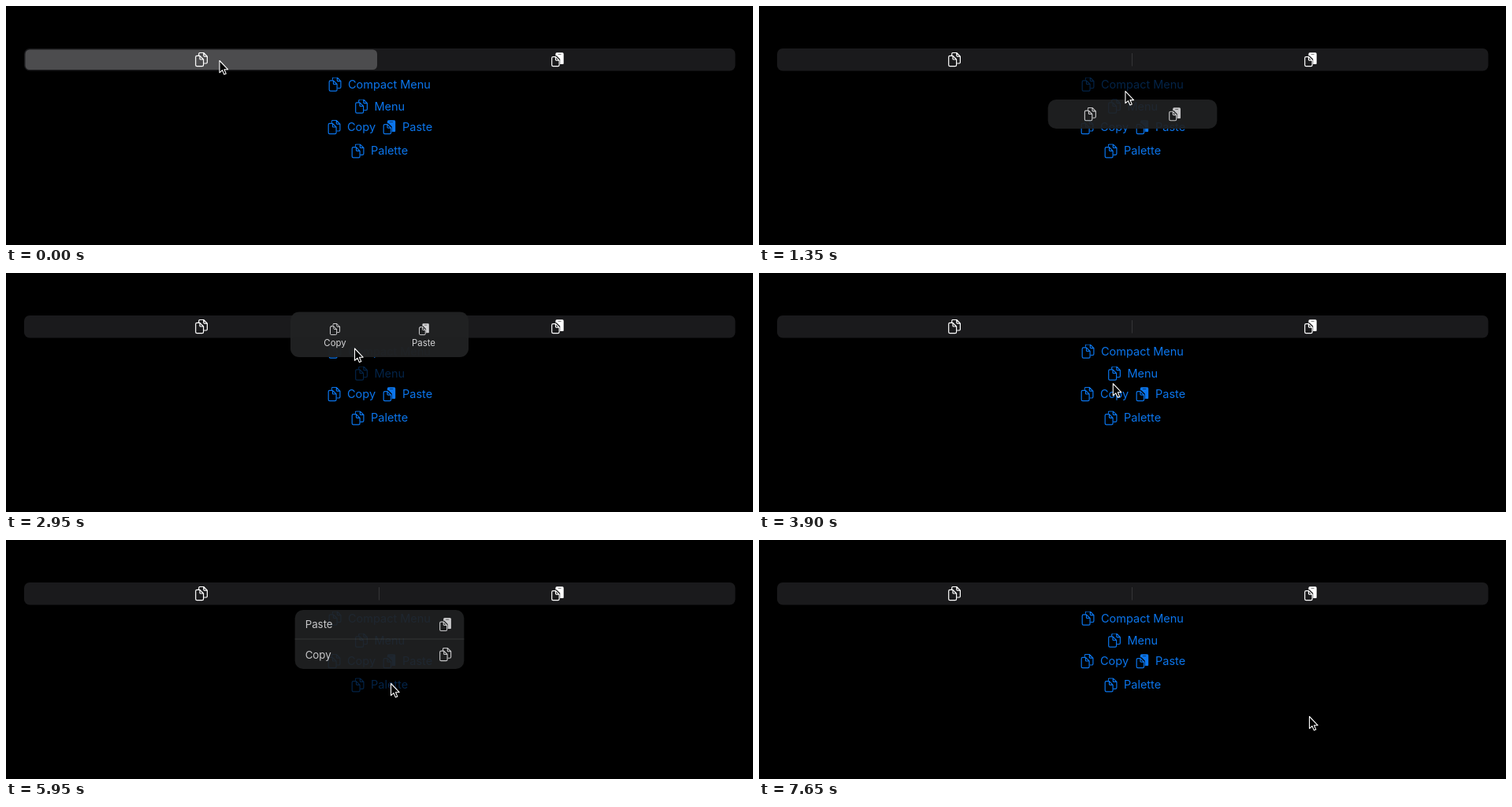
Animation, 948 px wide and 304 px high, one loop 7750 ms. Source, as an HTML page:

```html
<!DOCTYPE html>
<html lang="en">
<head>
<meta charset="utf-8">
<title>Control group styles</title>
<style>
html, body { margin: 0; width: 100%; height: 100%; overflow: hidden; background: #000; }
svg { display: block; width: 948px; height: 304px; }
text { font: 14.5px Inter, Roboto, sans-serif; fill: currentColor; }
.blue { color: #0b75ec; }
.white { color: #fff; }
.popup { color: #d2d2d4; }
.popup text { font-size: 14px; }
.small text { font-size: 11.4px; text-anchor: middle; }
.panel { fill: #202122; fill-opacity: .98; }
.line { fill: none; stroke: currentColor; stroke-width: 1.2; stroke-linejoin: round; stroke-linecap: round; }
</style>
</head>
<body>
<svg id="stage" viewBox="0 0 948 304"></svg>
<script>
const LOOP = 7750, STEP = 50, MID = 474, TRAVEL = 350;
const el = id => document.getElementById(id);
const clamp = x => Math.max(0, Math.min(1, x));
const ramp = (t, from, length) => clamp((t - from) / length);
const smooth = p => p * p * (3 - 2 * p);
const fade = (id, value) => el(id).setAttribute('opacity', value);

// ---- drawing helpers ----

// a sheet with rounded corners and a folded top right corner
function page(x, y, w, h, fold = 4.6, r = 1.6) {
  return `<path class="line" d="M${x + r} ${y}h${w - fold - r}l${fold} ${fold}v${h - fold - r}q0 ${r} ${-r} ${r}
    h${2 * r - w}q${-r} 0 ${-r} ${-r}v${2 * r - h}q0 ${-r} ${r} ${-r}z
    M${x + w - fold} ${y}v${fold - 1}q0 1 1 1h${fold - 1}"/>`;
}

const icon = (name, x, y, scale = 1) =>
  `<use href="#${name}" transform="translate(${x} ${y}) scale(${scale})"/>`;
const text = (x, y, words) => `<text x="${x}" y="${y}">${words}</text>`;
const label = (id, x, y, words, name = 'copy') =>
  `<g id="${id}Label">${icon(name, x, y)}${text(x + 16.5, y + 5.1, words)}</g>`;
const panel = (y, height) =>
  `<rect class="panel" x="361" y="${y}" width="226" height="${height}" rx="11"/>`;
const segment = (id, x) =>
  `<rect id="${id}" x="${x}" y="55.5" width="446.500" height="25.5" rx="5.5" fill="#4c4c4e"/>`;
const pair = (left, right, y, scale) => icon('copy', left, y, scale) + icon('paste', right, y, scale);

el('stage').innerHTML = `
  <defs>
    <clipPath id="behind"><path d="M-4-9H9V6H3.2V-.4L-1.200-4.800H-4z"/></clipPath>
    <g id="copy">${page(-7.3, -4.6, 9.9, 13.2)}<g clip-path="url(#behind)">${page(-3.3, -8.5, 10.7, 13.5)}</g></g>
    <g id="paste">
      <rect x="-2.600" y="-8.700" width="10.300" height="15" rx="1.600" fill="currentColor" clip-path="url(#behind)"/>
      <path d="M.6-6.400H4.600" stroke="#000" stroke-opacity=".5"/>
      ${page(-7.3, -3.4, 9.4, 12.1)}
    </g>
  </defs>
  <rect x="23" y="54" width="902.5" height="28.5" rx="7" fill="#1a1a1c"/>
  <path id="divider" d="M473.5 60V76.5" stroke="#353537"/>
  ${segment('left', 24.5)}${segment('right', 476.5)}
  <g class="white">${pair(248, 700, 68)}</g>
  <g class="blue">
    ${label('compact', 417.5, 99.5, 'Compact Menu')}
    ${label('menu', 451, 127.5, 'Menu')}
    ${label('copy', 416.5, 154, 'Copy')}${label('paste', 486.5, 154, 'Paste', 'paste')}
    ${label('palette', 446.5, 184.3, 'Palette')}
  </g>
  <g id="compactPopup" class="popup">${panel(119, 39)}${pair(417.5, 530.5, 138.5)}</g>
  <g id="menuPopup" class="popup small">
    ${panel(49.5, 57.5)}${pair(417.5, 530.5, 71.5, .82)}
    ${text(417.5, 92.7, 'Copy')}${text(530, 92.7, 'Paste')}
  </g>
  <g id="palettePopup" class="popup">
    ${panel(85, 79)}<path d="M361 124H587" stroke="#3a3b3d"/>
    ${text(374.7, 109.5, 'Paste')}${text(374.7, 150, 'Copy')}
    ${icon('paste', 562, 104.3)}${icon('copy', 562, 144.5)}
  </g>
  <path id="cursor" d="M0 0V15.300L3.500 12.200 5.900 17.600 8.300 16.600 6 11.200H10.600z"
    fill="#000" stroke="#fff" stroke-width="1.1" stroke-linejoin="round"/>`;

// ---- motion ----

// where the pointer rests, and when it gets there
const stops = [
  { at: 0, x: 271, y: 69.5 },
  { at: 600, x: 645, y: 67 },
  { at: 1100, x: 487, y: 97 },
  { at: 1550, x: 431, y: 134 },
  { at: 2050, x: 477, y: 112.5 },
  { at: 2950, x: 442.5, y: 96 },
  { at: 4000, x: 451, y: 152 },
  { at: 5150, x: 526, y: 152 },
  { at: 5550, x: 488.5, y: 182.5 },
  { at: 6900, x: 712, y: 236 },
  { at: 7600, x: 698.5, y: 224.5 }
];

// each hop starts TRAVEL ms before arrival and bows upwards a little
function pointer(t) {
  let { x, y } = stops[0];
  for (const stop of stops.slice(1)) {
    const p = smooth(ramp(t, stop.at - TRAVEL, TRAVEL));
    const dx = stop.x - x;
    x += dx * p;
    y += (stop.y - y) * p - Math.abs(dx) * .06 * Math.sin(Math.PI * p);
  }
  return [x, y];
}

// popups grow from the edge nearest their label, which dims meanwhile
function popup(t, name, edge, open, close) {
  const grow = ramp(t, open, 400), leave = ramp(t, close, 300);
  const scale = (1 - .4 * (1 - grow) ** 3) * (1 - .22 * smooth(leave));
  el(name + 'Popup').setAttribute('transform',
    `translate(${MID} ${edge}) scale(${scale}) translate(${-MID} ${-edge})`);
  fade(name + 'Popup', clamp(grow * 1.9) * (1 - leave));
  fade(name + 'Label', 1 - .7 * ramp(t, open - 50, 200) * (1 - leave));
}

const press = (t, name, at) =>
  fade(name + 'Label', 1 - .3 * ramp(t, at, 50) * (1 - ramp(t, at + 100, 200)));

function draw(now) {
  const t = Math.floor(now % LOOP / STEP) * STEP;
  const left = 1 - ramp(t, 50, 200);
  const right = ramp(t, 450, 150) * (1 - ramp(t, 650, 150));
  fade('left', left);
  fade('right', right);
  fade('divider', 1 - Math.max(left, right));
  popup(t, 'compact', 119, 1150, 1700);
  popup(t, 'menu', 107, 2450, 3250);
  popup(t, 'palette', 164, 5750, 7050);
  press(t, 'copy', 4700);
  press(t, 'paste', 5200);
  el('cursor').setAttribute('transform', `translate(${pointer(t)})`);
}

const start = performance.now();
function tick() {
  draw(performance.now() - start);
  requestAnimationFrame(tick);
}
tick();
</script>
</body>
</html>
```
